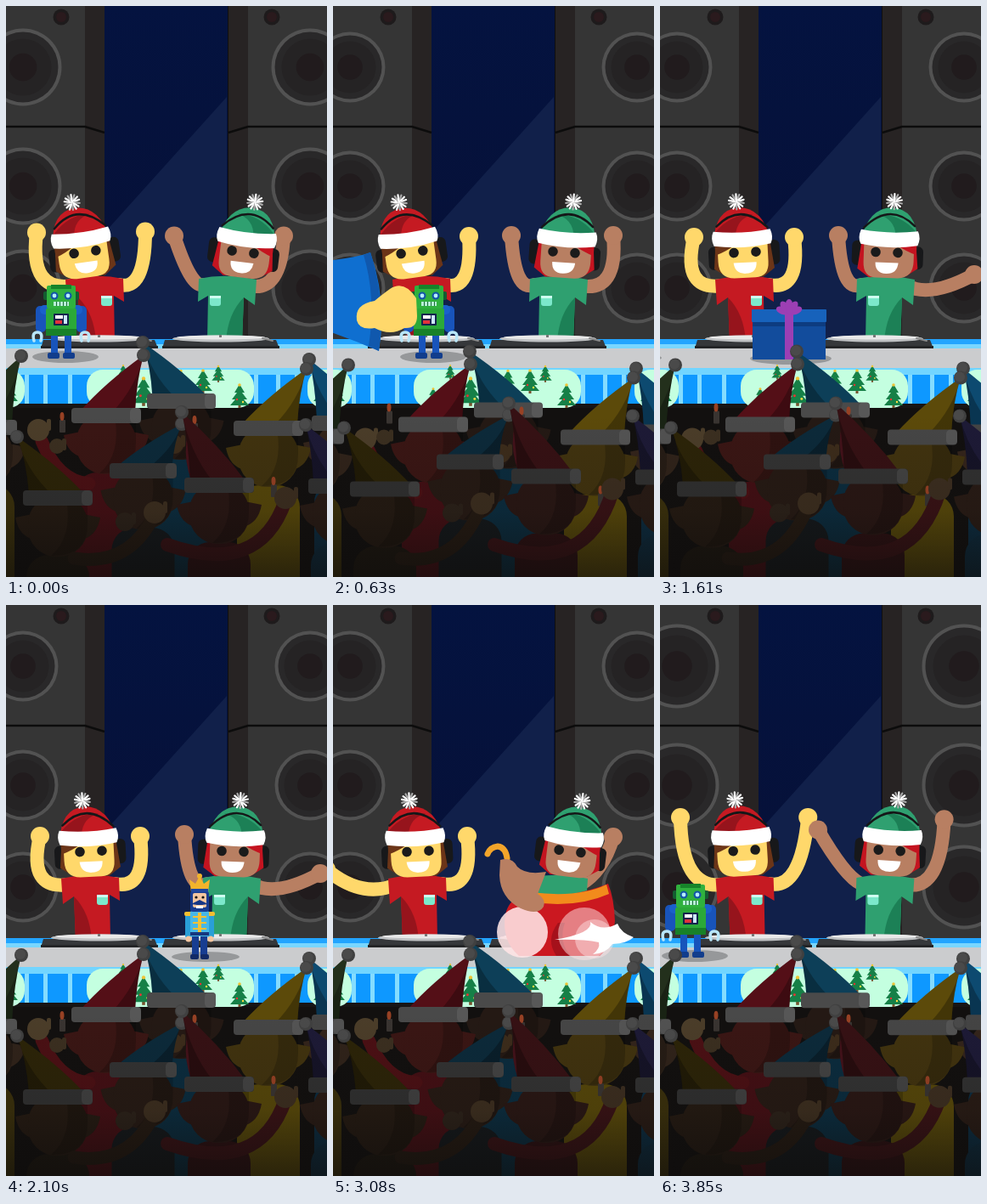
Write an HTML page with a canvas that moves like this. It is 378 px wide and 672 px high and loops after 3920 ms.

```html
<!DOCTYPE html>
<html lang="en">
<head>
<meta charset="utf-8">
<title>Holiday DJs</title>
<style>
html, body { margin: 0; width: 100%; height: 100%; overflow: hidden; background: #100f0f; }
canvas { display: block; width: 378px; height: 672px; }
</style>
</head>
<body>
<canvas id="stage" width="378" height="672"></canvas>
<script>
const c = document.getElementById('stage').getContext('2d');
const W = 378, H = 672, STEP = 70, COUNT = 56, TAU = Math.PI * 2;
const mix = (a, b, s) => a + (b - a) * s;
const clamp = (v, lo, hi) => Math.max(lo, Math.min(hi, v));

function rect(x, y, w, h, col, r = 0) {
  c.fillStyle = col;
  c.beginPath();
  c.roundRect(x, y, w, h, r);
  c.fill();
}
function oval(x, y, rx, ry, col, a = 0) {
  c.fillStyle = col;
  c.beginPath();
  c.ellipse(x, y, rx, ry, a, 0, TAU);
  c.fill();
}
const dot = (x, y, r, col) => oval(x, y, r, r, col);
function shape(d, col) {
  c.fillStyle = col;
  c.fill(new Path2D(d));
}
function line(d, col, w, cap = 'round') {
  c.strokeStyle = col;
  c.lineWidth = w;
  c.lineCap = cap;
  c.lineJoin = 'round';
  c.stroke(new Path2D(d));
}
function at(x, y, draw, angle = 0) {
  c.save();
  c.translate(x, y);
  c.rotate(angle);
  draw();
  c.restore();
}
function mirrored(draw) {
  c.save();
  c.translate(W, 0);
  c.scale(-1, 1);
  draw();
  c.restore();
}
// Linear track through [step, value] pairs
function track(i, keys) {
  for (let n = 1; n < keys.length; n++) {
    const [a, x] = keys[n - 1], [b, y] = keys[n];
    if (i >= a && i <= b) return mix(x, y, (i - a) / (b - a));
  }
  return null;
}

// Beat strength for each step of a seven-step beat
const BEAT = [.25, .08, 0, 0, .15, .6, 1];

function backdrop() {
  const g = c.createLinearGradient(0, 0, 0, 390);
  g.addColorStop(0, '#041340');
  g.addColorStop(1, '#071036');
  rect(115, 0, 146, 395, g);
  shape('M260 107L115 268V395H260Z', '#11204a');
}

function speakers(pulse) {
  rect(0, 0, 94, 395, '#353535');
  rect(93, 0, 23, 395, '#272323');
  line('M0 142H93L116 149', '#0c0c0c', 2.5, 'butt');
  dot(65, 13, 9.5, '#1e1b1c');
  dot(65, 13, 6, '#2a1a1d');
  const r = 40 + 8 * Math.sqrt(pulse);
  for (const y of [72, 212, 332]) {
    dot(20, y, r + 1.5, '#525252');
    dot(20, y, r - 2.5, '#292829');
    dot(20, y, r * .76, '#252324');
    dot(20, y, r * .37, '#211b1d');
  }
}

const LEFT = { skin: '#ffd86b', cloth: '#c51a22', dark: '#96141c', hair: '#6b3518' };
const RIGHT = { skin: '#b87f62', cloth: '#2fa070', dark: '#1c8056', hair: '#c41420' };

// Pose: head x, tilt, body x, outer fist, outer elbow, inner fist, inner elbow
const LEAN = [91, -8, 106, 40, 272, 27, 338, 160, 271, 164, 336];
const WRAP = [91, -8, 104, 40, 273, 50, 312, 160, 271, 164, 336];
const UPRIGHT = [98, -3, 101, 40, 272, 25, 336, 158, 272, 166, 336];
const REACH = [98, -3, 101, -8, 311, 34, 346, 158, 272, 166, 336];
const R_LEAN = [97, -7, 119, 55, 276, 54, 338, 176, 276, 160, 332];
const R_WRAP = [97, -7, 114, 48, 273, 60, 314, 176, 276, 160, 332];
const R_REST = [104, -4, 114, 48, 270, 42, 338, 168, 270, 164, 338];
const R_REACH = [109, -2, 114, 8, 316, 60, 344, 168, 270, 164, 338];
const R_HIGH = [107, -3, 114, 60, 274, 46, 336, 176, 288, 160, 318];
const LEFT_POSES = [LEAN, LEAN, WRAP, UPRIGHT, UPRIGHT, UPRIGHT, REACH, UPRIGHT];
const RIGHT_POSES = [R_LEAN, R_REST, R_REST, R_REACH, R_REACH, R_LEAN, R_WRAP, R_HIGH];

function poseAt(i, poses) {
  const k = Math.floor(i / 7), p = i % 7;
  const s = p === 6 ? .12 : 0, next = poses[(k + 1) % 8];
  return poses[k].map((v, n) => mix(v, next[n], s));
}

function arm(x, y, ex, ey, fx, fy, skin) {
  line(`M${x} ${y}Q${ex} ${ey} ${fx} ${fy}`, skin, 16);
  dot(fx, fy, 11, skin);
}

function head(k) {
  rect(-41, -8, 14, 27, '#17181a', 6);
  rect(28, -13, 15, 29, '#17181a', 6);
  shape('M-32 -12L-35 18L-22 27L22 30L36 20L32 -12Z', k.hair);
  shape('M-30 -12H29V12Q29 30 13 30H-12Q-30 29 -30 10Z', k.skin);
  shape('M-33 -10H-8Q-20 -2 -33 2Z', k.hair);
  dot(-11, 0, 5.8, '#1b1b1b');
  dot(15, 0, 5.8, '#1b1b1b');
  shape('M-12 12H15Q15 25 2 25Q-11 25 -12 12Z', '#fff');
  shape('M-34 -14Q-31 -52 -3 -53Q25 -52 33 -14Z', k.cloth);
  shape('M-31 -26Q-12 -46 14 -44Q-6 -40 -8 -20H-33Z', k.dark);
  line('M-30 -32Q0 -60 30 -28', '#151718', 2.5);
  shape('M-34 -26Q0 -21 33 -26Q37 -16 33 -9Q0 -3 -34 -9Q-38 -18 -34 -26Z', '#fff');
  at(-5, -60, () => {
    for (let n = 0; n < 14; n++) {
      c.rotate(TAU / 14);
      line('M0 0V-9', n % 3 ? '#fff' : '#aaa', 2.2);
    }
  });
}

function dj(k, pose, up, hideOuter, hideInner) {
  const [hx, tilt, bx, ofx, ofy, oex, oey, ifx, ify, iex, iey] = pose;
  if (!hideOuter) arm(bx - 27, 329, oex, oey, ofx - 16 * up, ofy - 22 * up, k.skin);
  if (!hideInner) arm(bx + 27, 328, iex, iey, ifx + 16 * up, ify - 22 * up, k.skin);
  at(bx, 0, () => {
    shape('M-36 322Q0 314 32 321L33 348L21 341L22 395H-19L-21 343L-34 352Z', k.cloth);
    shape('M-21 343Q-2 362 0 395H-19Z', k.dark);
    rect(6, 341, 13, 12, '#7ce8cb', 3);
    rect(6, 341, 13, 3, '#cffff0');
  });
  at(hx, 290 - up, () => head(k), tilt * Math.PI / 180);
}

function tree(x, y, s) {
  at(x, y, () => {
    c.scale(s, s);
    rect(-1.5, 9, 3, 5, '#77532e');
    shape('M0 -14L6 -4H3L9 4H5L11 11H-11L-5 4H-9L-3 -4H-6Z', '#168047');
    dot(0, -13, 1.8, '#eec336');
    dot(-3, 4, 1.2, '#e33');
    dot(4, 7, 1.2, '#fd4');
  });
}

function deck(x) {
  shape(`M${x + 3} 393H${x + 134}L${x + 138} 403H${x}Z`, '#35373a');
  rect(x, 400, 138, 4, '#232426');
  oval(x + 69, 391.5, 57, 4, '#bfc1c3');
  oval(x + 69, 390, 52, 2.5, '#e9e9e9');
  rect(x + 67, 387, 3, 3, '#777');
  line(`M${x + 118} 391L${x + 130} 394`, '#888', 2);
}

function table() {
  rect(0, 392, W, 12, '#22a4ff');
  rect(0, 398, W, 6, '#78d6ff');
  deck(41);
  deck(184);
  rect(0, 403, W, 25, '#cbccce');
  rect(0, 426, W, 48, '#171515');
  rect(0, 426, W, 42, '#0e98ff');
  rect(0, 426, W, 8, '#72d5ff');
  for (const x of [22, 44, 73, 292, 318, 340]) rect(x, 434, 5, 34, '#84dcff');
  rect(95, 428, 197, 45, '#c4ffe0', 19);
  rect(-30, 428, 52, 45, '#c4ffe0', 19);
  rect(355, 428, 52, 45, '#c4ffe0', 19);
  for (const [x, y, s] of [[138, 431, .6], [162, 454, 1.2], [180, 433, .6], [206, 441, .9],
    [232, 442, 1], [250, 433, .7], [275, 459, 1], [118, 461, .8], [4, 455, .9], [372, 455, .9]]) tree(x, y, s);
}

function robot() {
  oval(5, 413, 39, 7, '#96989a');
  for (const s of [-1, 1]) {
    rect(s * 24 - 6, 353, 12, 31, '#1854bb', 5);
    line(`M${s * 28 - 4} 394Q${s * 28 - 7} 384 ${s * 28} 384Q${s * 28 + 7} 384 ${s * 28 + 4} 394`, '#b8e6f8', 3.5);
    rect(s * 8 - 4, 386, 8, 25, '#1854bb');
    rect(s * 9 - 7, 408, 14, 7, '#123d8c', 2);
  }
  rect(-25, 352, 50, 11, '#1a60cb', 5);
  rect(-18, 356, 36, 32, '#2ba939', 2);
  rect(-18, 380, 36, 8, '#188128');
  rect(-9, 362, 18, 14, '#14234c', 1);
  rect(-7, 364, 9, 4, '#fff');
  rect(3, 364, 4, 10, '#cce8ff');
  rect(-7, 370, 8, 4, '#e2303b');
  rect(-21, 336, 42, 10, '#135d31', 2);
  rect(-17, 329, 34, 27, '#30b13e', 2);
  rect(-12, 328, 24, 5, '#17842a');
  for (const x of [-8, 8]) {
    dot(x, 341, 4.5, '#1355a8');
    dot(x, 341, 2.4, '#b5efff');
  }
  rect(-9, 348, 18, 5, '#b7eed5');
  for (let x = -6; x < 9; x += 4) rect(x, 348, 1, 5, '#176c38');
}

function nutcracker() {
  oval(7, 414, 40, 6, '#96989a');
  for (const s of [-1, 1]) {
    rect(s * 5 - 4, 388, 8, 25, '#173d91');
    rect(s * 6 - 5, 411, 10, 6, '#122a66', 2);
    rect(s * 13 - 4, 363, 8, 29, '#299fd8', 3);
    rect(s * 13 - 5, 361, 10, 5, '#f3be31', 2);
    dot(s * 13, 393, 3.5, '#f4c6a0');
  }
  rect(-11, 360, 22, 30, '#47b8e7', 2);
  rect(-2, 362, 4, 26, '#f3c136');
  for (let y = 366; y < 385; y += 7) rect(-8, y, 16, 2, '#f3c136');
  rect(-11, 385, 22, 4, '#17387f');
  rect(-11, 337, 22, 24, '#183c91', 3);
  rect(-8, 339, 16, 17, '#f4c6a0', 2);
  dot(-4, 344, 1.6, '#111');
  dot(4, 344, 1.6, '#111');
  shape('M0 347L10 352L3 353H-3L-10 352Z', '#163685');
  rect(-4, 354, 8, 3, '#fff');
  shape('M-10 338L-12 323L-5 328L0 319L5 328L12 323L10 338Z', '#f2b42b');
  rect(-10, 334, 20, 4, '#1e469e');
  dot(0, 319, 3, '#f2b42b');
}

function gift(body, lid, shade, ribbon) {
  oval(2, 415, 48, 7, '#96989a');
  rect(-43, 365, 86, 51, body);
  rect(-43, 371, 86, 6, shade);
  rect(-44, 357, 88, 15, lid, 1);
  rect(-5, 357, 10, 59, ribbon);
  for (let n = -2; n < 3; n++) at(0, 361, () => oval(0, -8, 4.5, 8, ribbon), n * .62);
  dot(0, 358, 4, ribbon);
}

function paperSweep(k, skin, paper, shade) {
  at((k - 9) * 26, 0, () => {
    shape('M44 290Q20 299 -40 302V372Q5 385 54 406Q64 347 44 290Z', paper);
    shape('M44 290Q62 345 54 406L42 400Q51 342 36 293Z', shade);
    shape('M98 344Q84 322 67 333Q56 341 49 347Q25 351 28 370Q31 382 49 379Q68 389 84 379Q99 380 99 365Z', skin);
  });
}

function swirl(k, skin, paper, shade, rim, ribbon, tint) {
  const a = (k - 16) * .9, sx = Math.sin(a) * 9, sy = Math.cos(a) * 3 - 3;
  shape('M45 328Q38 345 37 372Q40 400 55 413H150Q171 395 166 364Q162 347 148 344Q90 346 45 328Z', paper);
  shape('M47 329Q80 345 136 338L139 349Q85 358 44 340Z', rim);
  shape('M104 374Q119 394 106 413H89Q104 397 96 374Z', shade);
  c.globalAlpha = .5;
  dot(73 + sx, 387 + sy, 31, tint);
  c.globalAlpha = .45;
  dot(61 + sx, 393 + sy, 23, tint);
  c.globalAlpha = .88;
  dot(146 - sx, 385 + sy, 30, tint);
  c.globalAlpha = 1;
  at(62, 391, () => shape('M-47 0Q-32 -5 -28 -16Q-10 -6 4 -18Q0 -5 46 3Q13 2 -6 6Q-8 13 1 20Q-15 19 -22 8Q-40 7 -47 0Z', '#fff'), Math.sin(a) * .35);
  at(142, 335, () => {
    line('M22 -37Q24 -50 33 -51Q42 -50 45 -42', ribbon, 7);
    shape('M30 -35Q16 -39 10 -27Q0 -17 -24 -21L-14 5Q-24 11 -21 20Q-14 31 6 22Q30 10 31 -17Z', skin);
  }, Math.sin(a) * .12);
}

// Steps of the wrapping routine, in left-hand coordinates
function wrapping(k, skin, paper, shade, rim, ribbon, tint) {
  if (k >= 7 && k <= 11) paperSweep(k, skin, paper, shade);
  if (k >= 12 && k <= 20) swirl(k, skin, paper, shade, rim, ribbon, tint);
}

function put(x, draw) {
  if (x !== null) at(x, 0, draw);
}

function items(i) {
  const j = i > 50 ? i - COUNT : i;
  put(track(j, [[-3, -45], [-2, 0], [-1, 36], [0, 65], [1, 85], [2, 98], [3, 106], [5, 113], [12, 113]]), robot);
  put(track(i, [[23, -45], [24, -15], [25, 35], [27, 130], [28, 172], [29, 203], [30, 228], [31, 245], [33, 262], [40, 265]]), nutcracker);
  put(track(i, [[21, 118], [22, 130], [23, 152], [24, 186], [26, 266], [30, 436]]),
    () => gift('#124c9c', '#1762bb', '#0d3c80', '#9c3fb4'));
  put(track(i, [[49, 268], [50, 280], [51, 304], [52, 336], [55, 440]]),
    () => gift('#bd1420', '#d81d29', '#8e0c17', '#f39a20'));
}

function elf(tx, ty, x, y, w, hat, coat, skin, band, dy) {
  at(0, dy, () => {
    const m = x + w / 2, d = tx > m ? 1 : -1, a = m - d * 31, b = m + d * 34;
    rect(m - 37, y + 76, 74, 150, coat, 26);
    for (const s of [-1, 1]) {
      shape(`M${m + s * 30} ${y + 28}L${m + s * 50} ${y + 32}Q${m + s * 46} ${y + 54} ${m + s * 28} ${y + 58}Z`, skin);
    }
    rect(m - 35, y + 6, 70, 72, skin, 33);
    shape(`M${m + 10} ${y + 10}Q${m + 18} ${y + 55} ${m - 8} ${y + 77}Q${m + 35} ${y + 78} ${m + 35} ${y + 40}V${y + 10}Z`, 'rgba(0,0,0,.2)');
    shape(`M${a} ${y + 4}Q${mix(a, tx, .4)} ${mix(y, ty, .48)} ${tx} ${ty}Q${mix(b, tx, .2)} ${mix(y, ty, .55)} ${b} ${y + 4}Z`, hat);
    shape(`M${tx} ${ty}Q${mix(b, tx, .2)} ${mix(y, ty, .55)} ${b} ${y + 4}H${m + d * 8}Q${mix(m, tx, .8)} ${mix(y, ty, .4)} ${tx} ${ty}Z`, 'rgba(0,0,0,.28)');
    rect(x, y, w, 18, band, 4);
    rect(x + w - 13, y, 13, 18, 'rgba(255,255,255,.08)', 5);
    dot(tx, ty, 8, '#404040');
    dot(tx - 1, ty - 1, 6, '#4a4a4a');
  });
}

function hand(x, y, dy, col, r = 13) {
  dot(x, y + dy, r, col);
  rect(x + r - 3, y + dy - r, 5, 14, col, 2);
}

function candle(x, y, dy) {
  rect(x - 3, y + dy, 7, 15, '#393431', 1);
  oval(x, y + dy - 4, 2.5, 5, '#974124');
}

function crowd(i) {
  const s = (1 - clamp(2.2 * Math.cos(TAU * (i % 14 - 1.5) / 14), -1, 1)) / 2;
  const back = 10.5 * s, front = -10.5 * s;
  rect(0, 473, W, 199, '#12100f');
  elf(18, 412, -67, 487, 80, '#23301c', '#3a300c', '#30231a', '#444', back);
  elf(357, 416, 360, 482, 80, '#0d4a70', '#0c2c40', '#33241b', '#444', back);
  elf(161, 396, 166, 456, 81, '#0d3f58', '#0b2c3e', '#241914', '#4a4a4a', back);
  elf(162, 411, 77, 473, 82, '#540f17', '#430f14', '#3a1614', '#494949', back);
  elf(354, 427, 268, 488, 82, '#5c4a0a', '#56470a', '#41330f', '#464646', back);
  line(`M98 ${562 + back}Q62 ${560 + back} 42 ${512 + back}`, '#4b1014', 15);
  hand(38, 499, back, '#4b3d29');
  hand(60, 518, front, '#3b2f20', 9);
  hand(198, 516, back, '#3c2c1b', 11);
  candle(66, 487, front);
  candle(222, 491, front);
  candle(315, 563, back);
  line(`M222 ${505 + front}Q212 ${545 + front} 245 ${590 + front}`, '#43121a', 16);
  elf(13, 507, 20, 570, 82, '#2c2408', '#1c1710', '#241a12', '#303030', front);
  elf(207, 492, 122, 538, 79, '#0c2a3a', '#14181b', '#261a14', '#333', front);
  elf(207, 478, 210, 555, 82, '#361114', '#2c1012', '#291714', '#333', front);
  elf(353, 493, 356, 556, 80, '#1d1a36', '#0d2a3c', '#281b15', '#313131', front);
  line(`M80 650Q145 660 174 ${600 + front}`, '#241a12', 15);
  line(`M190 634Q298 672 329 ${582 + front}`, '#381215', 16);
  hand(175, 596, front, '#3c2e1f');
  hand(329, 579, front, '#3c2e20');
  hand(140, 607, front, '#2b2119', 11);
  const g = c.createLinearGradient(0, 480, 0, H);
  g.addColorStop(0, 'rgba(14,12,11,0)');
  g.addColorStop(.6, 'rgba(14,12,11,.12)');
  g.addColorStop(1, 'rgba(14,12,11,.6)');
  rect(0, 473, W, 199, g);
}

function draw(i) {
  const up = BEAT[i % 7], k = i - 28;
  c.clearRect(0, 0, W, H);
  backdrop();
  speakers(up);
  mirrored(() => speakers(up));
  dj(LEFT, poseAt(i, LEFT_POSES), up, i >= 7 && i <= 11, i >= 12 && i <= 20);
  mirrored(() => dj(RIGHT, poseAt(i, RIGHT_POSES), up, k >= 7 && k <= 11, k >= 12 && k <= 20));
  table();
  items(i);
  wrapping(i, LEFT.skin, '#0f6fd0', '#1058ad', '#0f5cb4', '#9b43b6', '#e2efff');
  mirrored(() => at(9, 0, () =>
    wrapping(k, RIGHT.skin, '#cb1820', '#a5111b', '#f28b1c', '#f3a52a', '#ffe5e6')));
  crowd(i);
}

let last = -1;
const start = performance.now();
function tick(now) {
  const i = Math.floor(Math.max(0, now - start) / STEP) % COUNT;
  if (i !== last) draw(last = i);
  requestAnimationFrame(tick);
}
draw(0);
requestAnimationFrame(tick);
</script>
</body>
</html>
```
